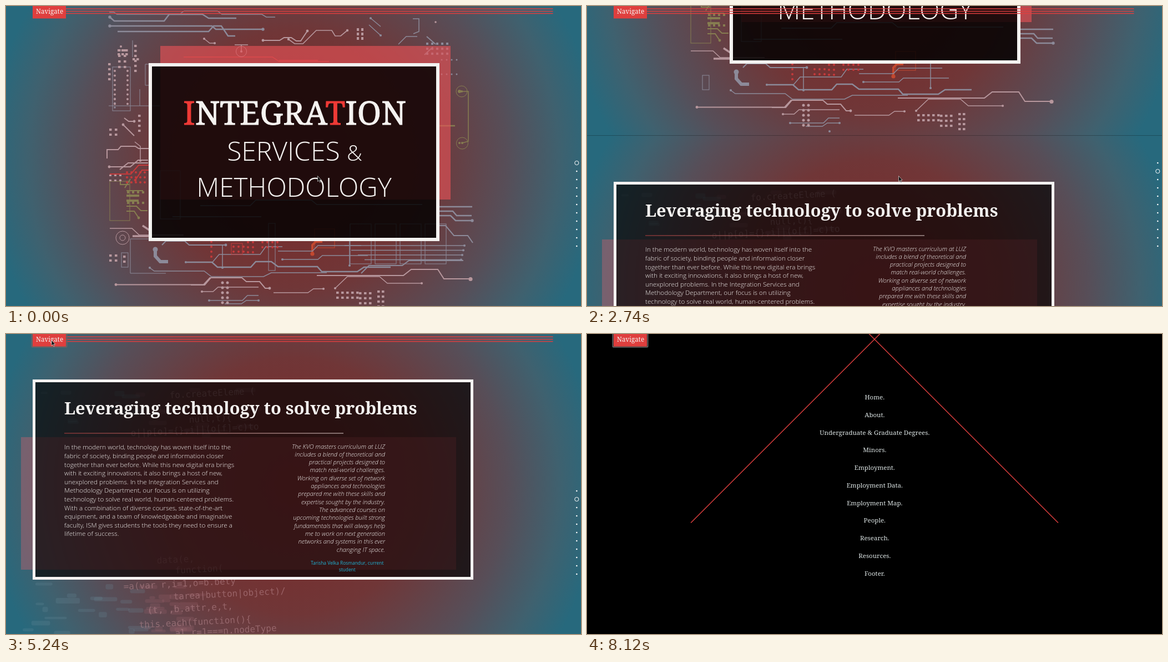
Recreate the animation shown at these times as an HTML page. Size 1036 by 541 pixels, loop 8.47 s.

```html
<!DOCTYPE html>
<html lang="en">
<head>
<meta charset="utf-8">
<title>Department page</title>
<style>
  html, body { margin: 0; width: 100%; height: 100%; overflow: hidden; background: #000; }
  svg { display: block; width: 100vw; height: 100vh; }
  text { fill: #f5f3f1; }
  .slab { font-family: "Noto Serif", serif; }
  .sans { font-family: "Open Sans", sans-serif; font-weight: 300; }
  .mid { text-anchor: middle; }
  .code { font: 16px "DejaVu Sans Mono", monospace; fill: #c08f96; opacity: .5; }
  .red { fill: #ee3a36; stroke: #ee3a36; }
  .bar { stroke: #df3f3f; stroke-width: 1.4; }
</style>
</head>
<body>
<svg viewBox="0 0 1036 541">
  <defs>
    <radialGradient id="glow" gradientUnits="userSpaceOnUse" cx="518" cy="276" r="550">
      <stop offset="0" stop-color="#7c2827"/>
      <stop offset=".42" stop-color="#703637"/>
      <stop offset=".7" stop-color="#574e58"/>
      <stop offset=".87" stop-color="#3f616f"/>
      <stop offset="1" stop-color="#27697d"/>
    </radialGradient>
    <linearGradient id="rule">
      <stop offset="0" stop-color="#b5403f"/>
      <stop offset="1" stop-color="#e0cfcd"/>
    </linearGradient>
  </defs>

  <g id="page">
    <rect width="1036" height="553" fill="url(#glow)"/>
    <g id="circuit" fill="none"></g>
    <rect x="278" y="72" width="523" height="277" fill="#eb5358" opacity=".62"/>
    <rect x="260" y="106" width="518" height="315" fill="#000" fill-opacity=".83" stroke="#f3f2f0" stroke-width="6"/>
    <text class="slab mid" x="520" y="214" font-size="58.5" font-weight="500" stroke="#f5f3f1"><tspan class="red">I</tspan>NTEGRA<tspan class="red">T</tspan>ION</text>
    <text class="sans mid" x="520" y="279" font-size="48">SERVICES <tspan font-size="39">&amp;</tspan></text>
    <text class="sans mid" x="519" y="344" font-size="47.5">METHODOLOGY</text>

    <rect width="1036" height="553" fill="url(#glow)" transform="translate(0 553)"/>
    <path d="M0 553.500h1036" stroke="#000" opacity=".25"/>
    <g transform="translate(0 555)">
      <g id="code"></g>
      <rect x="27" y="186" width="784" height="239" fill="#eb5f6b" opacity=".34"/>
      <rect x="50.500" y="84.500" width="789" height="356" fill="#000" fill-opacity=".66" stroke="#f5f3f2" stroke-width="5"/>
      <text class="slab" x="105" y="145" font-size="30.7" font-weight="700">Leveraging technology to solve problems</text>
      <rect x="105" y="178.500" width="503" height="1" fill="url(#rule)"/>
      <g id="copy" class="sans" font-size="11.7"></g>
      <g id="quote" class="sans" font-size="11.2" font-style="italic" text-anchor="end"></g>
      <g id="credit" class="sans mid" font-size="8.4" style="font-weight:400"></g>
    </g>
  </g>

  <g id="dots" fill="#fff"></g>
  <circle id="ring" cx="1028.300" r="3.600" fill="none" stroke="#fff"/>
  <g id="bars" class="bar"><path d="M108 5h877.500M108 9.500h877.500M108 13.500h877.500"/></g>

  <g id="menu">
    <rect width="1036" height="541"/>
    <g id="links" class="slab mid" font-size="11.5"></g>
    <rect id="veil" width="1036" height="541"/>
    <path id="armA" class="bar" d="M50 9.500h936"/>
    <path id="armB" class="bar" d="M50 9.500h936"/>
  </g>

  <rect id="focus" x="46.500" y="-3" width="63" height="26.500" rx="1.500" fill="none" stroke="#686464" stroke-width="2"/>
  <rect x="48" width="60" height="22.500" fill="#df3f3e"/>
  <text class="slab" x="54" y="13.500" font-size="11.7">Navigate</text>
  <path id="cursor" d="M0 0v10l2.300-2 1.700 3.600 1.500-.7-1.700-3.500h3z" fill="#111" stroke="#ddd" stroke-width=".7"/>
</svg>

<script>
const $ = id => document.getElementById(id);
const LOOP = 8470, CLEAR = 480;
const SLATE = '#8c8a99', PINK = '#b7979d', GREEN = '#867d50', RED = '#c63a3b', ORANGE = '#c3482f';

// ---- circuit board: each part is cleared, then comes back at its own time ----
const parts = [];
let on = 0, off = CLEAR;

function add(tag, attrs) {
  const el = document.createElementNS('http://www.w3.org/2000/svg', tag);
  for (const k in attrs) el.setAttribute(k, attrs[k]);
  $('circuit').append(el);
  parts.push({ el, on, off });
  return el;
}
const dot = (color, cx, cy, r) => add('circle', { cx, cy, r, fill: color });
const ring = (color, cx, cy, r) => add('circle', { cx, cy, r, stroke: color });
const box = (color, x, y, width, height) => add('rect', { x, y, width, height, stroke: color });

// ends: 1 = dot at the start, 2 = dot at the end, 3 = both
function trace(color, width, d, ends = 0) {
  const path = add('path', { d, stroke: color, 'stroke-width': width });
  const tip = at => { const p = path.getPointAtLength(at); dot(color, p.x, p.y, width * .6 + 1.2); };
  if (ends & 1) tip(0);
  if (ends & 2) tip(path.getTotalLength());
}
function pads(color, x, y, cols, rows, dx, dy, w = 4.5, h = 4, round = 0) {
  let d = '';
  for (let i = 0; i < cols * rows; i++) {
    const px = x + i % cols * dx, py = y + Math.floor(i / cols) * dy;
    if (round) dot(color, px, py, w / 2);
    else d += `M${px} ${py}h${w}v${h}h${-w}z`;
  }
  if (d) add('path', { d, fill: color });
}

on = 750;
trace(SLATE, 1.5, 'M186 11h8l6 4h112l9-6h60l8 6h72l8 5h16');
trace(SLATE, 2.5, 'M187 20l8 7h90l9-12h60l11 7h50', 1);
trace(SLATE, 2.5, 'M187 36h184l7 6h85', 3);
trace(SLATE, 2.5, 'M201 46h164l9-10h14l12 18h13');
box(SLATE, 192, 110, 32, 79);
on = 990;
trace(PINK, 1.7, 'M509 60l11 8h15l24-24h28l6 10h10l12-10', 3);
trace(SLATE, 1.5, 'M657 22l18 15M654 34l21 19', 3);
pads(PINK, 632, 40, 2, 3, 8, 8, 4, 5);
trace(SLATE, 1.5, 'M733 23h11v23l-10 4M707 69l14-14h20');
dot(PINK, 774, 29, 1.8);
trace(SLATE, 1, 'M258 105h-7v38h7M185 180h56v-30M241 180h36');
on = 1220;
pads(PINK, 201, 78, 3, 2, 7, 7);
pads(PINK, 228, 94, 2, 1, 7, 7);
trace(SLATE, 1, 'M228 62v30');
dot(PINK, 207, 73, 2);
pads(SLATE, 757, 66, 5, 3, 9, 9, 4, 4);
trace(SLATE, 2, 'M758 55l16 14M754 88l15-14');
pads(SLATE, 785, 97, 4, 2, 9, 26, 3, 3, 1);
on = 1460;
trace(PINK, 2, 'M211 214l20 20M213 202l8 6h10', 3);
pads(PINK, 186, 221, 2, 2, 10, 9);
pads(SLATE, 196, 167, 1, 3, 8, 8, 3.5, 3, 1);
box(GREEN, 187, 316, 36, 71);
trace(GREEN, 4, 'M217 342h23M217 351h22');
trace(GREEN, 2, 'M206 312v10h16M224 312l-10 16M217 333h30M217 361h18l8 8h12M217 370h14l8 12', 2);
pads(GREEN, 218, 334, 4, 2, 9, 19, 4, 4);
box(SLATE, 278, 297, 36, 87);
trace(RED, 1.5, 'M320 92h160l12 8h90M492 98h70');
on = 1700;
trace(PINK, 1.5, 'M187 401h40l13 12h80');
trace(PINK, 3.5, 'M228 415h32M246 396l12 8');
box(SLATE, 208, 445, 12, 26);
trace(SLATE, 6, 'M269 439v12l9 10h14');
dot(SLATE, 269, 439, 4.5);
trace(SLATE, 2, 'M281 431l7-7h34l8 7h66', 2);
trace(SLATE, 1.5, 'M324 462h48l12-14h74l10-14h30M390 430v42', 3);
box(ORANGE, 556, 402, 36, 34);
trace(ORANGE, 4, 'M552 447v-16l6-6h12', 1);
trace(SLATE, 1.5, 'M350 360h90l10-10h100l10 8h190M300 380h160');

on = 1940;
trace(SLATE, 1.5, 'M498 457h64l8-7h82M490 442h62l10-10h78M619 424v44', 3);
trace(SLATE, 2.5, 'M326 462h45l10 9h60l9-10h28l12 9h71l8 9h64l12-8h48');
trace(SLATE, 1.5, 'M259 472l8 6h90l13 10h94l14-7h100', 1);
dot(GREEN, 817, 154, 3);
dot(GREEN, 817, 247, 2);
pads(RED, 410, 434, 3, 2, 9, 9, 4, 4, 1);
on = 2170;
trace(PINK, 2, 'M560 486h156l14-11h48l11 17h48', 2);
dot(PINK, 837, 492.500, 3.6);
trace(PINK, 1.5, 'M593 509l22-21h58l14 12h62', 3);
trace(PINK, 2, 'M333 503h25l11-13h56l8 7h24l10 12h8', 2);
pads(PINK, 595, 515, 5, 2, 9, 9);
pads(PINK, 636, 516, 3, 3, 9, 9);
pads(PINK, 669, 513, 2, 4, 8, 9);
on = 2440;
trace(PINK, 1.5, 'M353 515h20l9-8h73M482 517h62l10-7h18', 3);
trace(SLATE, 1.5, 'M366 531h60l9-9h20M394 537h30l9-6h22', 3);

on = 2740;
trace(PINK, 2, 'M198 502.500h158l12-13', 1);
pads(PINK, 390, 499, 2, 5, 9, 9, 5, 5, 1);
dot(SLATE, 437, 546, 2);
trace(SLATE, 2.5, 'M781 362h59M781 370h24l7 8h27M781 378h20l9 9h30', 2);
pads(RED, 370, 425, 1, 4, 8, 9, 4, 4, 1);
pads(RED, 436, 426, 2, 3, 9, 9, 4, 4, 1);
pads(RED, 462, 426, 4, 2, 9, 9, 4, 4, 1);

on = 3100;
trace(PINK, 2, 'M463 62h30l8-5h13l9 6h8l12-18', 3);
trace(PINK, 1.5, 'M357 59l10 8h9', 3);
ring(PINK, 424, 82, 9.500);
trace(PINK, 1.5, 'M424 82v-12M412 70h24', 1);
pads(PINK, 202, 78, 2, 4, 10, 10);
pads(PINK, 184, 103, 1, 4, 10, 9);
pads(PINK, 196, 117, 1, 8, 10, 8.500, 4, 4, 1);
pads(PINK, 219, 117, 1, 8, 10, 8.500, 4, 4, 1);
trace(PINK, 2, 'M182 275v-16h20l5-6h26l6 4h18');
trace(PINK, 2, 'M186 290h38l14-12h18M205 295l15-12h36', 1);
trace(RED, 2, 'M257 287h-18l-14 16h-38M257 296h-12l-12 18', 2);
pads(RED, 218, 300, 5, 3, 8, 9, 4, 4, 1);
pads(PINK, 186, 304, 3, 2, 9, 9, 4, 3);
trace(GREEN, 1.5, 'M821 154h12v90l-11 3', 3);
ring(GREEN, 821, 154, 10);
ring(GREEN, 822, 247.500, 10.500);
trace(GREEN, 2.5, 'M781 216h28');
ring(PINK, 210, 418, 12);
ring(PINK, 210, 418, 5);
pads(PINK, 186, 448, 2, 2, 10, 9);
pads(PINK, 211, 450, 1, 2, 10, 9);
trace(SLATE, 1, 'M258 420h-34v62h64');
trace(SLATE, 2, 'M781 396h11l15 18h25l9 13');
for (let i = 0; i < 4; i++) box(SLATE, 620 + i * 45, 393, 38, 72);
for (let i = 0; i < 4; i++) trace(SLATE, 1.5, `M${610 + i * 12} ${432 + i * 8.5}h${216 - i * 14}`, 2);
trace(SLATE, 2, 'M640 482l14-14h60l12-9h98');
box(RED, 406, 428, 20, 20);
box(SLATE, 473, 392, 12, 85);

// a few parts go dark a moment earlier
off = 210;
pads(PINK, 231, 70, 1, 6, 8, 9);
pads(PINK, 238, 196, 1, 4, 9, 9);
trace(PINK, 1.5, 'M232 245l10 8v26', 2);

// ---- blurred code behind the second section ----
let seed = 7;
const rand = () => (seed = seed * 16807 % 2147483647) / 2147483647;
let code = '';
for (let i = 0; i < 70; i++) {
  const low = i < 45, x = 30 + rand() * (low ? 300 : 400), y = low ? 448 + rand() * 90 : 95 + rand() * 85;
  code += `<rect x="${x}" y="${y}" width="${10 + rand() * 34}" height="${4 + rand() * 6}" rx="3" fill="${x < 230 ? '#6d93a0' : '#a66b72'}" opacity=".2"/>`;
}
const snippets = [
  [295, 116, 'fo.createEleme  ('], [330, 160, 'null,t){'], [225, 184, 'o||p[o]={},i||(o[f]=c)to'],
  [272, 414, 'data(e,'], [305, 432, 'function('], [212, 461, '=a(var r,i=1,o=b.bety'],
  [302, 479, 'tarea|button|object)/'], [255, 504, '(t,  ,b.attr,e,t,'],
  [240, 530, 'this.each(function(){'], [305, 545, 'al r=1===n.nodeType']
];
for (const [x, y, s] of snippets) code += `<text class="code" transform="translate(${x} ${y}) rotate(-3)">${s}</text>`;
$('code').innerHTML = code;

// ---- text blocks ----
function lines(id, x, y, step, text, fill = '#f5f3f1') {
  $(id).innerHTML = text.split('|').map((s, i) =>
    `<text x="${x}" y="${y + i * step}" style="fill:${fill}">${s}</text>`).join('');
}
lines('copy', 105, 208.3, 15.6, 'In the modern world, technology has woven itself into the|fabric of society, binding people and information closer|together than ever before. While this new digital era brings|with it exciting innovations, it also brings a host of new,|unexplored problems. In the Integration Services and|Methodology Department, our focus is on utilizing|technology to solve real world, human-centered problems.|With a combination of diverse courses, state-of-the-art|equipment, and a team of knowledgeable and imaginative|faculty, ISM gives students the tools they need to ensure a|lifetime of success.');
lines('quote', 683, 206.5, 14.33, 'The KVO masters curriculum at LUZ|includes a blend of theoretical and|practical projects designed to|match real-world challenges.|Working on diverse set of network|appliances and technologies|prepared me with these skills and|expertise sought by the industry.|The advanced courses on|upcoming technologies built strong|fundamentals that will always help|me to work on next generation|networks and systems in this ever|changing IT space.');
lines('credit', 614.7, 415.5, 12, 'Tarisha Velka Rosmandur, current|student', '#1fb4d6');
lines('links', 518.3, 118, 31.75, 'Home.|About.|Undergraduate &amp; Graduate Degrees.|Minors.|Employment.|Employment Data.|Employment Map.|People.|Research.|Resources.|Footer.', '#dde5e5');

const dotY = i => 283 + i * 15;
$('dots').innerHTML = Array.from({ length: 11 }, (_, i) => `<circle cx="1028.300" cy="${dotY(i)}" r="1.300"/>`).join('');

// ---- timeline ----
const ticks = [0, 210, 480, 750, 990, 1220, 1460, 1700, 1940, 2170, 2440, 2740, 3100, 3460,
  3900, 4080, 4260, 4430, 4610, 4790, 5240, 6400, 6640, 6840, 7030, 7230, 7590, 7760, 8120];
const scrollKeys = [[2440, 0], [2740, 320], [3100, 553], [3460, 555]];
const cursorKeys = [[3460, 561.5, 306.5], [4790, 82, 11], [6400, 82, 11], [7230, 691, 309], [7760, 1024, 531]];

function tween(keys, t, k = 1) {
  if (t <= keys[0][0]) return keys[0][k];
  for (let i = 1; i < keys.length; i++) {
    const a = keys[i - 1], b = keys[i];
    if (t <= b[0]) return a[k] + (b[k] - a[k]) * (t - a[0]) / (b[0] - a[0]);
  }
  return keys[keys.length - 1][k];
}
const smooth = x => (x = Math.min(1, Math.max(0, x)), x * x * (3 - 2 * x));
const show = (el, yes) => el.style.display = yes ? '' : 'none';

function draw(t) {
  const open = t >= 6400, active = t >= 2440 ? 1 : 0;
  for (const p of parts) show(p.el, t < p.off || t >= p.on);
  $('page').setAttribute('transform', `translate(0 ${-tween(scrollKeys, t)})`);

  $('ring').setAttribute('cy', dotY(active));
  [...$('dots').children].forEach((d, i) => show(d, i !== active));

  show($('menu'), open);
  show($('focus'), t >= 5240);
  $('veil').setAttribute('y', Math.min(541, 237 + Math.max(0, t - 6400) * 1.3));
  const a = 45 * smooth((t - 6200) / 800), b = 45 * smooth((t - 6400) / 800);
  $('armA').setAttribute('transform', `rotate(${-a} 518 9.500)`);
  $('armB').setAttribute('transform', `rotate(${b} 518 9.500)`);
  show($('armB'), b > 0);
  for (const id of ['dots', 'ring', 'bars']) show($(id), !open);

  $('cursor').setAttribute('transform', `translate(${tween(cursorKeys, t)} ${tween(cursorKeys, t, 2)})`);
  show($('cursor'), t < 8120);
}

function frame() {
  const now = performance.now() % LOOP;
  draw(ticks.filter(x => x <= now).pop());
  requestAnimationFrame(frame);
}
frame();
</script>
</body>
</html>
```
